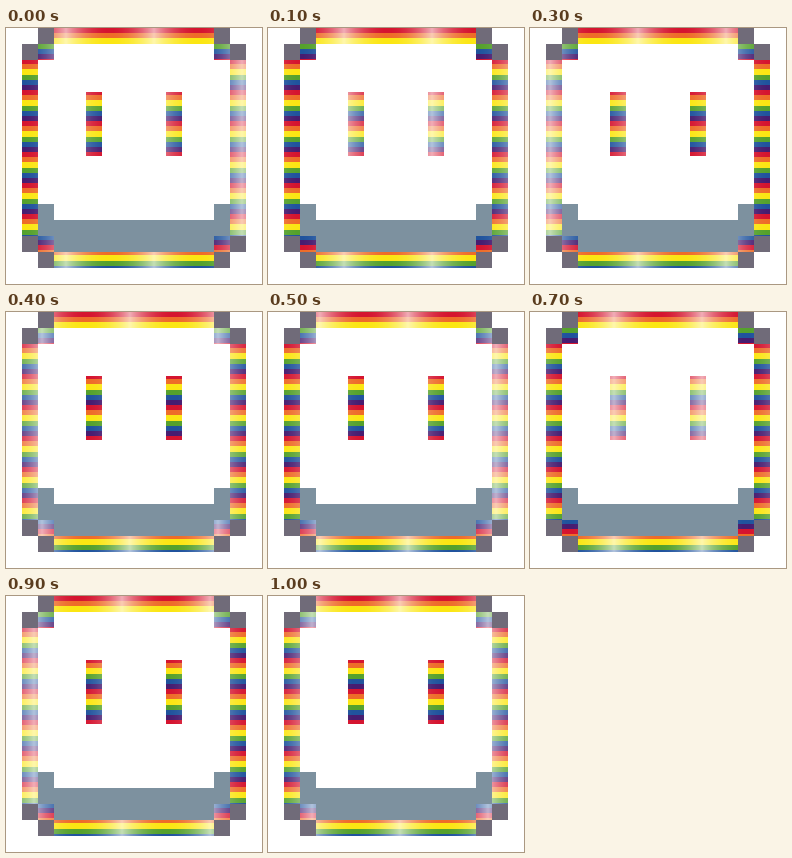
An HTML page with a canvas for the animation above (1.1 s loop, 256 by 256 pixels).

```html
<!DOCTYPE html>
<html lang="en">
<head>
<meta charset="utf-8">
<title>Rainbow block</title>
<style>
  html, body { margin: 0; width: 100%; height: 100%; overflow: hidden; background: #fff; }
  canvas { display: block; }
</style>
</head>
<body>
<canvas id="stage" width="256" height="256"></canvas>
<script>
const ctx = document.getElementById('stage').getContext('2d');
const SIZE = 256, CELL = 16, LAST = 14;
const STRIPE = 5.17;
const FRAME = 100, FRAMES = 11;
const PERIOD = 88, STEP = 16, START = 60, SHINE = 0.65;
const RAINBOW = ['#d5142f', '#ee6c28', '#fbe612', '#55a12c', '#20539d', '#471c70'];

// Decide what a grid cell holds from its distance to the nearest edges
function material(x, y) {
  const u = Math.min(x - 1, LAST - x);
  const v = Math.min(y, LAST - y);
  if (u < 0 || v < 0 || u + v === 0) return 'empty';
  if (u + v === 1) return 'corner';
  const eye = u === 4 && y >= 4 && y < 8;
  if (u === 0 || v === 0 || u + v === 2 || eye) return 'rainbow';
  if (y >= (u === 1 ? 11 : 12)) return 'shadow';
  return 'empty';
}

function shape(kind) {
  const path = new Path2D();
  for (let y = 0; y <= LAST; y++) {
    for (let x = 1; x <= LAST; x++) {
      if (material(x, y) === kind) path.rect(x * CELL, y * CELL, CELL, CELL);
    }
  }
  return path;
}

const corners = shape('corner');
const shadow = shape('shadow');
const rainbow = shape('rainbow');

function fill(path, color) {
  ctx.fillStyle = color;
  ctx.fill(path);
}

function drawStripes() {
  for (let i = 0; i * STRIPE < SIZE; i++) {
    ctx.fillStyle = RAINBOW[i % RAINBOW.length];
    ctx.fillRect(0, Math.round(i * STRIPE), SIZE, STRIPE + 1);
  }
}

// Repeating white bands, brightest at their centre
function drawShine(centre) {
  for (let x = 0; x < SIZE; x++) {
    const turns = (x + 0.5 - centre) / PERIOD;
    const distance = 2 * Math.abs(turns - Math.round(turns));
    ctx.fillStyle = `rgba(255,255,255,${SHINE * (1 - distance) ** 2})`;
    ctx.fillRect(x, 0, 1, SIZE);
  }
}

function draw(now) {
  const step = Math.floor(now / FRAME) % FRAMES;
  ctx.clearRect(0, 0, SIZE, SIZE);
  fill(shadow, '#7d919f');
  fill(corners, '#706b79');
  ctx.save();
  ctx.clip(rainbow);
  drawStripes();
  drawShine(START + step * STEP);
  ctx.restore();
}

function tick() {
  draw(performance.now());
  requestAnimationFrame(tick);
}
tick();
</script>
</body>
</html>
```
